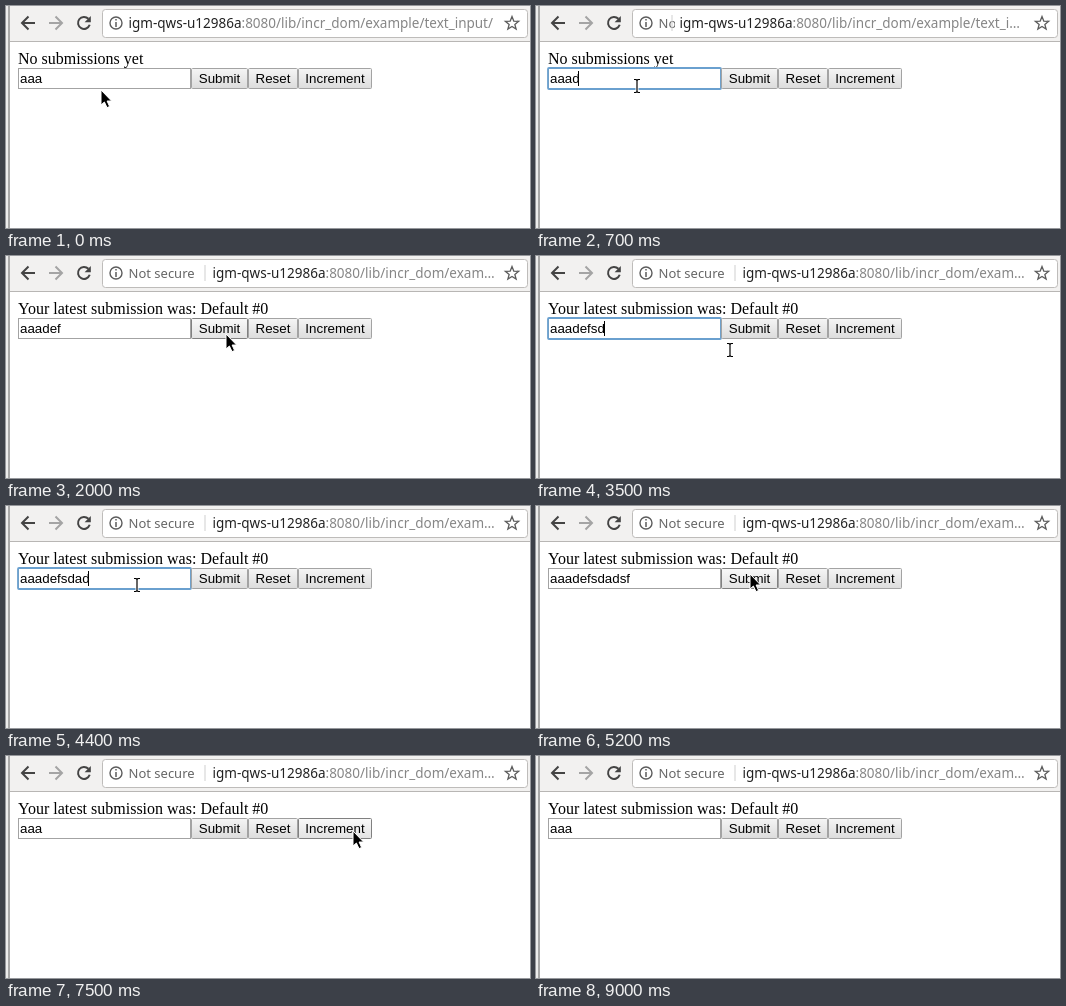
Recreate the animation shown at these times as an HTML page. Size 524x222 px, loop 9.4 s.

```html
<!DOCTYPE html>
<html lang="en">
<head>
<meta charset="utf-8">
<title>Text input</title>
<style>
  html, body { margin: 0; width: 100%; height: 100%; overflow: hidden; background: #fff; }
  svg { display: block; width: 524px; height: 222px; }
  text { white-space: pre; }
  .bar { font-family: "Noto Sans", sans-serif; font-size: 13.5px; }
  .page { font: 16px "Liberation Serif", serif; }
  .form { font: 13.333px "Liberation Sans", sans-serif; }
  .icon { fill: none; stroke: #444; stroke-width: 2; }
  .button rect { fill: url(#face); stroke: #a3a3a3; }
  .button.hover rect { fill: url(#lit); stroke: #808080; }
  .button text { text-anchor: middle; }
</style>
</head>
<body>
<svg viewBox="0 0 524 222">
  <defs>
    <linearGradient id="face" x2="0" y2="1">
      <stop offset="0" stop-color="#f5f5f5"/><stop offset="1" stop-color="#dcdcdc"/>
    </linearGradient>
    <linearGradient id="lit" x2="0" y2="1">
      <stop offset="0" stop-color="#f9f9f9"/><stop offset="1" stop-color="#e2e2e2"/>
    </linearGradient>
    <clipPath id="chipClip"><rect id="chipRoom" x="120" y="4" height="27"/></clipPath>
  </defs>

  <rect width="524" height="222" fill="#fff"/>
  <rect width="524" height="35" fill="#f2f1f0"/>
  <rect y="35" width="524" height="1" fill="#b8b6b4"/>
  <rect width="2" height="222" fill="#ececec"/>
  <rect x="2" width="2" height="222" fill="#a8a8a8"/>

  <path class="icon" d="M29 17H16M22.5 10.5L16 17L22.5 23.5"/>
  <path class="icon" style="stroke:#a4a4a4" d="M43 17H56M49.5 10.5L56 17L49.5 23.5"/>
  <path class="icon" d="M82.4 12.8A6 6 0 1 0 83.7 18.8"/>
  <path d="M84.8 10V16.2H78.6Z" fill="#444"/>

  <rect x="96.5" y="3.5" width="425" height="28" rx="3" fill="#fff" stroke="#bebcba"/>
  <circle class="icon" cx="110" cy="17" r="6" style="stroke:#5c5c5c;stroke-width:1.4"/>
  <path d="M110 13V14.6M110 16V21" stroke="#5c5c5c" stroke-width="1.5"/>
  <polygon id="star" fill="none" stroke="#5c5c5c" stroke-width="1.3"/>
  <g class="bar">
    <g clip-path="url(#chipClip)">
      <text x="122.5" y="22" style="font-size:13px" fill="#666">Not secure</text>
    </g>
    <rect id="divider" y="9" width="1" height="16" fill="#cfcfcf"/>
    <text id="url" y="22" fill="#222">igm-qws-u12986a<tspan id="path" fill="#868686"></tspan></text>
  </g>

  <text id="status" class="page" x="12" y="58"></text>
  <g class="form">
    <rect x="12.5" y="62.5" width="172" height="20" fill="#fff" stroke="#a3a3a3"/>
    <rect id="ring" x="12" y="62" width="173" height="21" rx="1" fill="none" stroke="#6aa0cf" stroke-width="1.8"/>
    <text id="value" x="14" y="77"></text>
    <rect id="caret" y="65" width="1" height="15"/>
    <g id="buttons"></g>
  </g>

  <g id="pointer">
    <path id="arrow" d="M0 0V15L3.4 12L6 17.6L8.6 16.5L6.1 11H10.6Z" stroke="#fff" stroke-width="1" stroke-linejoin="round"/>
    <g id="beam" fill="none">
      <path d="M-3-6.5H-1L0-5.5L1-6.5H3M0-5.5V5.5M-3 6.5H-1L0 5.5L1 6.5H3" stroke="#fff" stroke-width="3"/>
      <path d="M-3-6.5H-1L0-5.5L1-6.5H3M0-5.5V5.5M-3 6.5H-1L0 5.5L1 6.5H3" stroke="#000" stroke-width="1.2"/>
    </g>
  </g>
</svg>
<script>
const LOOP = 9400;
const PATH = ":8080/lib/incr_dom/example/text_input/";
const $ = id => document.getElementById(id);

// Every table holds rows of [start time, value...].
const typing = [[0, "aaa"], [700, "aaad"], [1000, "aaade"], [1100, "aaadef"], [3100, "aaadefs"],
  [3200, "aaadefsd"], [4400, "aaadefsdad"], [4500, "aaadefsdadsf"], [7500, "aaa"]];
const focus = [[0, false], [400, true], [1900, false], [2800, true], [3900, false], [4200, true], [5100, false]];
const status = [[0, "No submissions yet"], [1900, "Your latest submission was: Default #0"]];
const chip = [[0, 0], [700, .25], [800, .65], [1000, 1]];
const beam = [[0, false], [200, true], [1200, false], [2500, true], [3700, false], [4000, true],
  [5000, false], [5600, true], [5900, false]];
const mouse = [
  [0, 95, 84], [100, 96, 79], [200, 101, 80],
  [1100, 118, 84], [1200, 160, 92], [1300, 203, 92], [1400, 218, 91],
  [1600, 219, 88], [1700, 220, 82], [1800, 220, 78],
  [2300, 214, 76], [2400, 196, 76], [2500, 172, 76], [2600, 152, 76], [2700, 142, 76],
  [3300, 158, 86], [3400, 180, 97], [3500, 194, 94],
  [3700, 200, 82], [3800, 206, 75], [4000, 178, 82], [4200, 131, 79],
  [4700, 151, 87], [4900, 172, 82], [5000, 200, 74], [5100, 212, 69], [5200, 214, 68],
  [5500, 205, 73], [5600, 181, 88],
  [5900, 196, 91], [6000, 232, 92], [6100, 278, 91], [6200, 318, 86], [6300, 340, 80], [6400, 347, 77],
  [7000, 347, 75],
  [8500, 330, 66], [8600, 290, 52], [8700, 236, 38], [8800, 170, 22], [8900, 90, 4], [9000, -50, -50]
];
const at = (rows, t) => rows.findLast(row => row[0] <= t);

const buttons = [["Submit", 185, 242], ["Reset", 242, 292], ["Increment", 292, 366]].map(([label, left, right]) => {
  const add = (tag, parent, attrs) => {
    const el = document.createElementNS("http://www.w3.org/2000/svg", tag);
    for (const key in attrs) el.setAttribute(key, attrs[key]);
    return parent.appendChild(el);
  };
  const el = add("g", $("buttons"), { class: "button" });
  add("rect", el, { x: left + .5, y: 62.5, width: right - left - 1, height: 20, rx: 1 });
  add("text", el, { x: (left + right) / 2, y: 77 }).textContent = label;
  return { el, left, right };
});

$("star").setAttribute("points", Array.from({ length: 10 }, (_, i) => {
  const r = i % 2 ? 3 : 7, a = i * Math.PI / 5;
  return [506 + r * Math.sin(a), 17.5 - r * Math.cos(a)].map(n => n.toFixed(2)).join();
}).join(" "));

let shownChip, shownValue;

function layoutUrl(p) {
  if (p === shownChip) return;
  shownChip = p;
  const x = 122.5 + 84 * p;
  $("url").setAttribute("x", x);
  $("chipRoom").setAttribute("width", 76 * p);
  $("divider").setAttribute("x", x - 8);
  $("divider").style.opacity = p ? 1 : 0;
  $("path").textContent = PATH;
  for (let n = PATH.length - 1; n && x + $("url").getComputedTextLength() > 492; n--) {
    $("path").textContent = PATH.slice(0, n) + "…";
  }
}

function show(id, on) {
  $(id).style.display = on ? "" : "none";
}

function render(t) {
  layoutUrl(at(chip, t)[1]);
  $("status").textContent = at(status, t)[1];

  const value = at(typing, t)[1];
  if (value !== shownValue) {
    shownValue = value;
    $("value").textContent = value;
    $("caret").setAttribute("x", Math.floor(14 + $("value").getComputedTextLength() - .8));
  }
  const focused = at(focus, t)[1];
  show("ring", focused);
  show("caret", focused);

  const [, x, y] = at(mouse, t);
  const isBeam = at(beam, t)[1];
  $("pointer").setAttribute("transform", `translate(${x} ${y})`);
  show("beam", isBeam);
  show("arrow", !isBeam);
  for (const { el, left, right } of buttons) {
    el.classList.toggle("hover", !isBeam && x >= left && x < right && y >= 62 && y < 83);
  }
}

const start = performance.now();
function tick() {
  render((performance.now() - start) % LOOP);
  requestAnimationFrame(tick);
}
tick();
</script>
</body>
</html>
```
